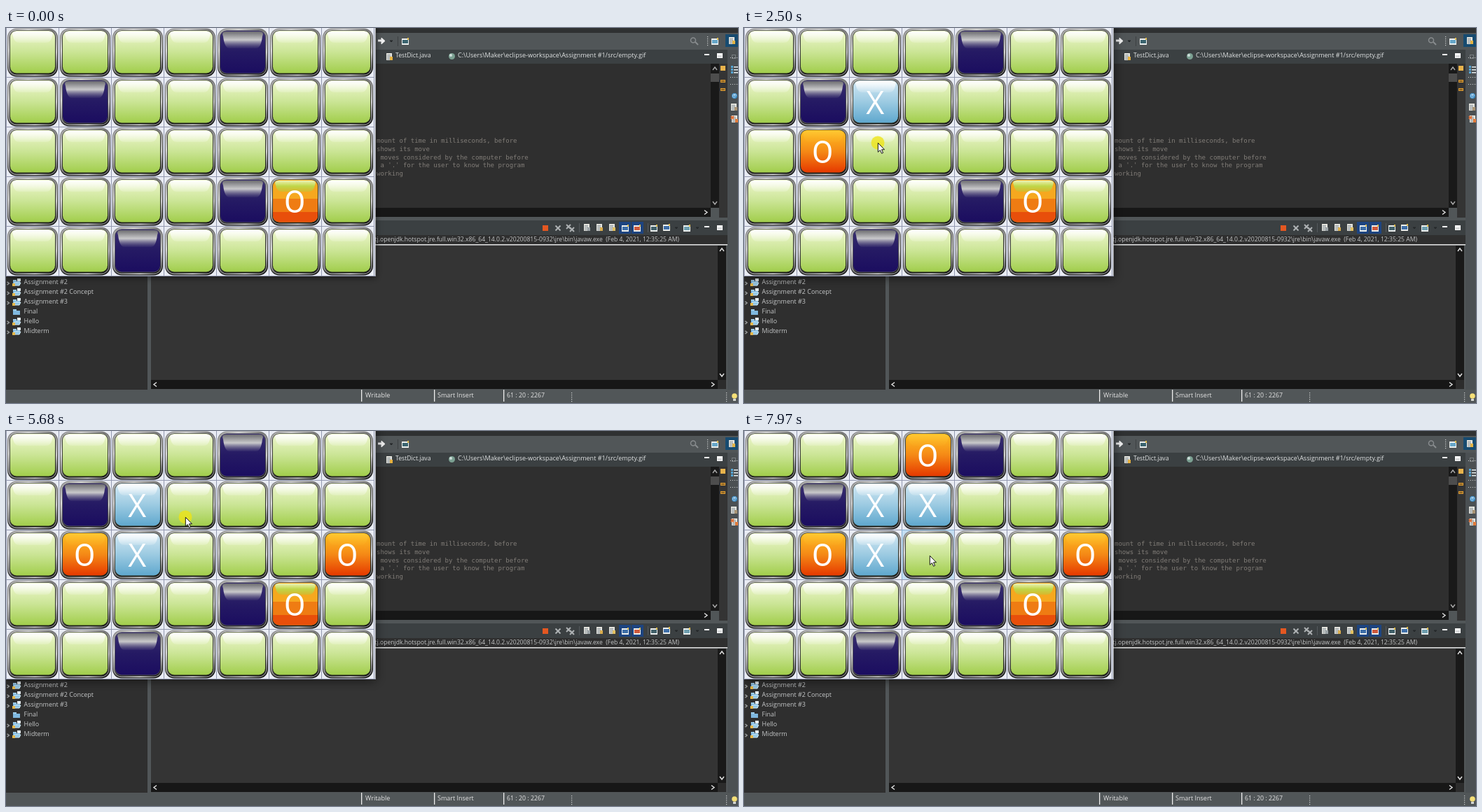
An HTML page with a canvas that plays this animation: 1045x536 px, repeating every 8000 ms.

```html
<!DOCTYPE html>
<html lang="en">
<head>
<meta charset="utf-8">
<title>Board game in an IDE</title>
<style>
html, body { margin: 0; width: 100%; height: 100%; overflow: hidden; background: #2f2f2f; }
canvas { display: block; }
</style>
</head>
<body>
<canvas id="stage" width="1045" height="536"></canvas>
<script>
const LOOP = 8000, COLS = 7, ROWS = 5, CELL_W = 75, CELL_H = 71, TOP = -1;
const SANS = '"Open Sans", "Noto Sans", sans-serif';
const MONO = '"DejaVu Sans Mono", "Liberation Mono", monospace';
const stage = document.getElementById('stage').getContext('2d');
let g = stage;

// Pointer moves: first step, last step, number of steps, destination
const MOVES = [
  [100, 100, 1, 616, 448], [210, 760, 6, 140, 104],
  [980, 1100, 2, 164, 99], [1190, 1420, 3, 186, 240],
  [2170, 2500, 4, 191, 164], [2610, 2930, 4, 264, 198],
  [3050, 3050, 1, 272, 200], [3360, 3360, 1, 274, 199],
  [3900, 4030, 2, 287, 179], [4670, 4910, 3, 267, 176],
  [5130, 5680, 6, 256, 123], [5790, 5910, 2, 306, 174],
  [6010, 6010, 1, 310, 175], [6210, 6210, 1, 309, 177],
  [6550, 7310, 8, 282, 176], [7430, 7970, 6, 265, 178]
];
// No cell lights up between a click and the computer's answer
const TURNS = [
  { click: 1100, end: 1190, reply: 1640, x: [1, 2], o: [2, 1] },
  { click: 2500, end: 2620, reply: 3050, x: [2, 2], o: [2, 6] },
  { click: 5680, end: 5790, reply: 6210, x: [1, 3], o: [0, 3] }
];
const START = { '0,4': 'dark', '1,1': 'dark', '3,4': 'dark', '4,2': 'dark', '3,5': 'banded' };
const FILLS = {
  green: ['#eff7cf', '#cbe596', '#a2ce4d'],
  dark: ['#3a3070', '#251a64', '#1b0d60'],
  X: ['#d3e8f3', '#9dcbe2', '#60a8ce'],
  O: ['#ffc022', '#f58a16', '#e63a00']
};
const GLOSS = {
  dark: ['#6c6c70', '#c9c9cb', 'rgba(120,116,145,.1)'],
  banded: ['#eef2b5', '#bfd649', '#d9b62c'],
  O: ['rgba(255,225,100,.25)', 'rgba(255,210,60,.05)'],
  plain: ['rgba(255,255,255,.95)', 'rgba(255,255,255,.15)']
};

function rect(x, y, w, h, color) {
  g.fillStyle = color;
  g.fillRect(x, y, w, h);
}
function text(s, x, y, size = 9, color = '#c4c6c7', align = 'left', family = SANS, baseline = 'middle') {
  g.font = `${size}px ${family}`;
  g.textAlign = align;
  g.textBaseline = baseline;
  g.fillStyle = color;
  g.fillText(s, x, y);
}
function line(points, color, width = 1, fill) {
  g.beginPath();
  points.forEach(([x, y]) => g.lineTo(x, y));
  if (fill) { g.closePath(); g.fillStyle = fill; g.fill(); }
  g.strokeStyle = color;
  g.lineWidth = width;
  g.stroke();
}
function disc(x, y, r, color) {
  g.beginPath();
  g.arc(x, y, r, 0, 7);
  g.fillStyle = color;
  g.fill();
}
function round(x, y, w, h, r) {
  g.beginPath();
  g.roundRect(x, y, w, h, r);
}
function gradient(x0, y0, x1, y1, colors) {
  const paint = g.createLinearGradient(x0, y0, x1, y1);
  colors.forEach((c, i) => paint.addColorStop(i / (colors.length - 1), c));
  return paint;
}

// Small interface parts
function chevron(x, y, dx, dy, color = '#e4e4e4') {
  line([[x - dx * 2 - dy * 3, y - dy * 2 - dx * 3], [x + dx * 2, y + dy * 2],
    [x - dx * 2 + dy * 3, y - dy * 2 + dx * 3]], color, 1.4);
}
function caret(x, y) {
  line([[x - 2, y - 1], [x + 2, y - 1], [x, y + 1]], '#25282a', 1, '#25282a');
}
function cross(x, y, r, color) {
  line([[x - r, y - r], [x + r, y + r]], color, 2);
  line([[x + r, y - r], [x - r, y + r]], color, 2);
}
function dots(x, y) {
  for (let i = -2; i < 3; i++) rect(x, y + i * 3, 1.2, 1.2, '#d0d2d3');
}
function page(x, y, accent) {
  rect(x - 4, y - 5, 8, 10, '#e5e5df');
  for (let i = -3; i < 4; i += 2) rect(x - 3, y + i, 5, 1, '#8b959b');
  rect(x + 1, y, 4, 5, accent);
}
function view(x, y, accent) {
  rect(x - 5, y - 4, 10, 9, '#edf0ef');
  rect(x - 4, y - 2, 8, 5, accent);
  rect(x + 3, y - 5, 2, 3, '#e2bd4d');
}
function windowButtons(y) {
  rect(997, y - 2, 7, 2, '#fff');
  rect(1015, y - 3, 8, 7, '#fff');
  rect(1016, y, 6, 3, '#d8dadb');
}
function folder(x, y, project) {
  rect(x - 5, y - 4, 5, 3, '#9fcdea');
  rect(x - 5, y - 2, 10, 6, '#7fb8df');
  if (!project) return;
  line([[x - 5, y + 4], [x - 3, y], [x + 6, y], [x + 4, y + 4]], '#d6edf7', 1, '#8fc6e5');
  rect(x + 1, y - 6, 5, 4, '#e6edf0');
  rect(x - 6, y + 1, 4, 4, '#e3b64b');
}

function drawEditor() {
  rect(0, 0, 1045, 536, '#515658');
  rect(528, 0, 517, 7, '#2f3132');
  rect(528, 31, 502, 20, '#3b4042');
  line([[531, 18], [537, 18]], '#f2f2f2', 3);
  line([[536, 14], [541, 18.5], [536, 23]], '#f2f2f2', 1, '#f2f2f2');
  caret(550, 19);
  rect(559, 12, 1, 14, '#3d4143');
  view(570, 19, '#3c6570');
  g.beginPath();
  g.arc(981, 17.5, 3.5, 0, 7);
  g.strokeStyle = '#888c8e';
  g.lineWidth = 1.5;
  g.stroke();
  line([[984, 20], [988, 24]], '#888c8e', 2);
  dots(1001, 18);
  view(1012, 19, '#67a7c9');
  rect(1027, 9, 18, 18, '#174b70');
  page(1036, 18, '#e2b344');

  page(547, 41, '#e5b13f');
  text('TestDict.java', 556, 40, 8.7, '#e0e2e3');
  disc(636.5, 40.5, 4.5, '#7ba092');
  disc(635, 39, 2, '#cfdedb');
  text('C:\\Users\\Maker\\eclipse-workspace\\Assignment #1/src/empty.gif', 645, 40, 9, '#e0e2e3');
  windowButtons(39);

  rect(528, 51, 478, 206, '#2f2f2f');
  rect(1006, 51, 12, 206, '#191919');
  rect(1006, 65, 12, 12, '#4d4d4d');
  rect(1018, 51, 12, 220, '#343434');
  chevron(1012, 58, 0, -1, '#aaa');
  chevron(1012, 250, 0, 1, '#aaa');
  rect(1020, 54, 7, 7, '#e9b34b');
  [76, 88].forEach(y => {
    rect(1020, y - 2, 7, 4, '#8d6425');
    g.strokeStyle = '#dc9b32';
    g.lineWidth = 1;
    g.strokeRect(1020.5, y - 1.5, 6, 3);
  });
  rect(206, 257, 800, 13, '#171717');
  chevron(999, 263.5, 1, 0);
  ['mount of time in milliseconds, before', 'shows its move',
    ' moves considered by the computer before',
    " a '.' for the user to know the program", 'working'
  ].forEach((s, i) => text(s, 529, 162 + i * 11.7, 9, '#817d78', 'left', MONO));
}

function drawConsole() {
  rect(206, 275, 824, 21, '#3b4042');
  rect(766, 282, 8, 8, '#e45721');
  cross(788, 286, 3.5, '#aeb2b4');
  cross(803, 284, 3, '#aeb2b4');
  cross(808, 288, 3, '#aeb2b4');
  page(829, 285, '#9ba3a7');
  page(847, 285, '#d9ad4d');
  page(865, 285, '#e2c060');
  rect(875, 277, 17, 17, '#1d4480');
  rect(893, 277, 17, 17, '#1d4480');
  view(884, 286, '#3f6fa8');
  view(901, 286, '#cf5a3d');
  view(925, 286, '#42616a');
  view(943, 285, '#3f6fa8');
  caret(957, 286);
  view(972, 286, '#6f9faf');
  caret(987, 286);
  [818, 916].forEach(x => rect(x, 279, 1, 13, '#555a5d'));
  windowButtons(285);
  rect(206, 296, 824, 13, '#2f2f2f');
  text('org.eclipse.justj.openjdk.hotspot.jre.full.win32.x86_64_14.0.2.v20200815-0932\\jre\\bin\\javaw.exe  (Feb 4, 2021, 12:35:25 AM)',
    961, 303, 8.62, '#c4c6c7', 'right');
  rect(206, 309, 824, 1.5, '#dedede');
  rect(207, 311, 809, 192, '#343434');
  rect(1016, 311, 12, 192, '#191919');
  rect(207, 503, 809, 13, '#171717');
  rect(1016, 503, 12, 13, '#2c2c2c');
  chevron(1022, 317, 0, -1);
  chevron(1022, 496, 0, 1);
  chevron(213, 509.5, -1, 0);
  chevron(1009, 509.5, 1, 0);
}

function drawSides() {
  rect(0, 340, 202, 177, '#2f2f2f');
  ['Assignment #2', 'Assignment #2 Concept', 'Assignment #3', 'Final', 'Hello', 'Midterm'].forEach((s, i) => {
    const y = 364 + i * 14, project = s !== 'Final';
    if (project) chevron(3, y + 1, .7, 0, '#9a9d9e');
    folder(15, y, project);
    text(s, 25.5, y);
  });
  [507, 611, 710].forEach(x => rect(x, 517, 1.3, 17, '#eee'));
  text('Writable', 513, 526, 9, '#e4e4e4');
  text('Smart Insert', 616, 526, 9, '#e4e4e4');
  text('61 : 20 : 2267', 715, 526, 8.8, '#e4e4e4');
  dots(807, 527);
  dots(1028, 527);
  disc(1040, 526, 3.8, '#f5df77');
  rect(1038, 530, 4, 3, '#d5d7d4');

  rect(1030, 31, 15, 486, '#4b5053');
  [42, 70, 80].forEach(y => {
    for (let x = 1034; x < 1045; x += 3) rect(x, y, 1, 1, '#d0d2d3');
  });
  g.strokeStyle = '#777d80';
  g.lineWidth = 1;
  g.strokeRect(1036.5, 38.5, 5, 5);
  [55, 59, 63].forEach(y => {
    rect(1035, y - 1, 3, 3, '#57a7d6');
    rect(1039, y, 6, 1.5, '#e7edf0');
  });
  disc(1040, 97, 4, '#3a8cc6');
  text('@', 1040, 97, 7, '#fff', 'center');
  page(1039, 113, '#a99474');
  page(1040, 130, '#e07a3a');
  cross(1037, 128, 2, '#e0713a');
}

function drawCell(row, col, kind, hovered) {
  const x = col * CELL_W, y = row * CELL_H + TOP;
  rect(x, y, CELL_W, CELL_H, hovered ? '#c4dff3' : '#e9ecf4');
  g.lineWidth = 1;
  g.strokeStyle = hovered ? '#86afd2' : '#9399b0';
  g.strokeRect(x + .5, y + .5, CELL_W, CELL_H);

  // Metal bezel
  round(x + 2, y + 1.5, 72, 69, 13);
  g.fillStyle = gradient(x, y, x + 25, y + 70, ['#8a8a8a', '#777', '#4a4a4a', '#080808']);
  g.fill();
  round(x + 4, y + 3.3, 68, 65, 11);
  g.lineWidth = 1.8;
  g.strokeStyle = gradient(x, y, x + 75, y + 70, ['#808080', '#ededed', '#777', '#e6e6e6', '#333']);
  g.stroke();
  round(x + 5.3, y + 4.5, 65.4, 62, 10);
  g.fillStyle = kind === 'dark' ? '#55555e' : '#2b2f22';
  g.fill();

  round(x + 6, y + 5, 64, 60.5, 9);
  if (kind === 'banded') {
    g.save();
    g.clip();
    rect(x, y, 75, 71, '#f6a81f');
    rect(x, y + 32, 75, 19, '#ef7c13');
    rect(x, y + 51, 75, 20, '#e84f0b');
    g.restore();
  } else {
    g.fillStyle = gradient(0, y + 5, 0, y + 65, FILLS[kind]);
    g.fill();
  }

  // Gloss
  const bottom = y + (kind === 'dark' ? 30 : 22);
  g.beginPath();
  g.moveTo(x + 14, y + 6);
  g.lineTo(x + 62, y + 6);
  g.quadraticCurveTo(x + 69, y + 6, x + 66, y + 13);
  g.quadraticCurveTo(x + 64, bottom, x + 57, bottom);
  g.lineTo(x + 19, bottom);
  g.quadraticCurveTo(x + 12, bottom, x + 10, y + 13);
  g.quadraticCurveTo(x + 7, y + 6, x + 14, y + 6);
  g.fillStyle = gradient(0, y + 6, 0, bottom, GLOSS[kind] || GLOSS.plain);
  g.fill();

  if (kind === 'X') text('X', x + 37.3, y + 52.5, 45, '#fff', 'center', SANS, 'alphabetic');
  if (kind === 'O' || kind === 'banded') {
    text('O', x + 37.2, y + 52, 44, '#fff', 'center', 'Roboto, sans-serif', 'alphabetic');
  }
}

function pointerAt(t) {
  let pos = null;
  for (const [start, end, steps, x, y] of MOVES) {
    if (t < start) break;
    const done = steps > 1 ? Math.min(steps, 1 + Math.floor((t - start) * (steps - 1) / (end - start) + .06)) : 1;
    const p = done / steps;
    pos = pos ? [pos[0] + (x - pos[0]) * p, pos[1] + (y - pos[1]) * p] : [x, y];
  }
  return pos;
}

function drawPointer([x, y], pressed) {
  if (pressed) disc(x, y, 9.5, 'rgba(238,228,20,.78)');
  const shape = [[0, 0], [0, 13], [3, 10.3], [5.3, 15], [7.3, 14], [5.2, 9.5], [9.2, 9.5]];
  line([...shape, shape[0]].map(([dx, dy]) => [x + dx + .3, y + dy + .3]), '#111', 1, '#fff');
}

const backdrop = document.createElement('canvas');
backdrop.width = 1045;
backdrop.height = 536;
g = backdrop.getContext('2d');
drawEditor();
drawConsole();
drawSides();
g = stage;

function draw(t) {
  g.drawImage(backdrop, 0, 0);
  const kinds = { ...START };
  for (const turn of TURNS) {
    if (t < turn.reply) break;
    kinds[turn.x] = 'X';
    kinds[turn.o] = 'O';
  }
  const pos = pointerAt(t);
  const waiting = TURNS.some(turn => t >= turn.click && t < turn.reply);
  const hoverCell = pos && !waiting &&
    [Math.floor((pos[1] - TOP) / CELL_H), Math.floor(pos[0] / CELL_W)].join();

  g.save();
  g.shadowColor = 'rgba(0,0,0,.55)';
  g.shadowBlur = t < 1050 ? 9 : 14;
  g.shadowOffsetY = 2;
  rect(0, -20, 527.5, 375, '#e9ecf2');
  g.restore();
  for (let row = 0; row < ROWS; row++) {
    for (let col = 0; col < COLS; col++) {
      const key = [row, col].join();
      drawCell(row, col, kinds[key] || 'green', key === hoverCell);
    }
  }
  rect(0, 354, 528, 1, '#9399b0');

  if (pos) drawPointer(pos, TURNS.some(turn => t >= turn.click && t < turn.end));
}

function frame() {
  draw(performance.now() % LOOP);
  requestAnimationFrame(frame);
}
frame();
</script>
</body>
</html>
```
